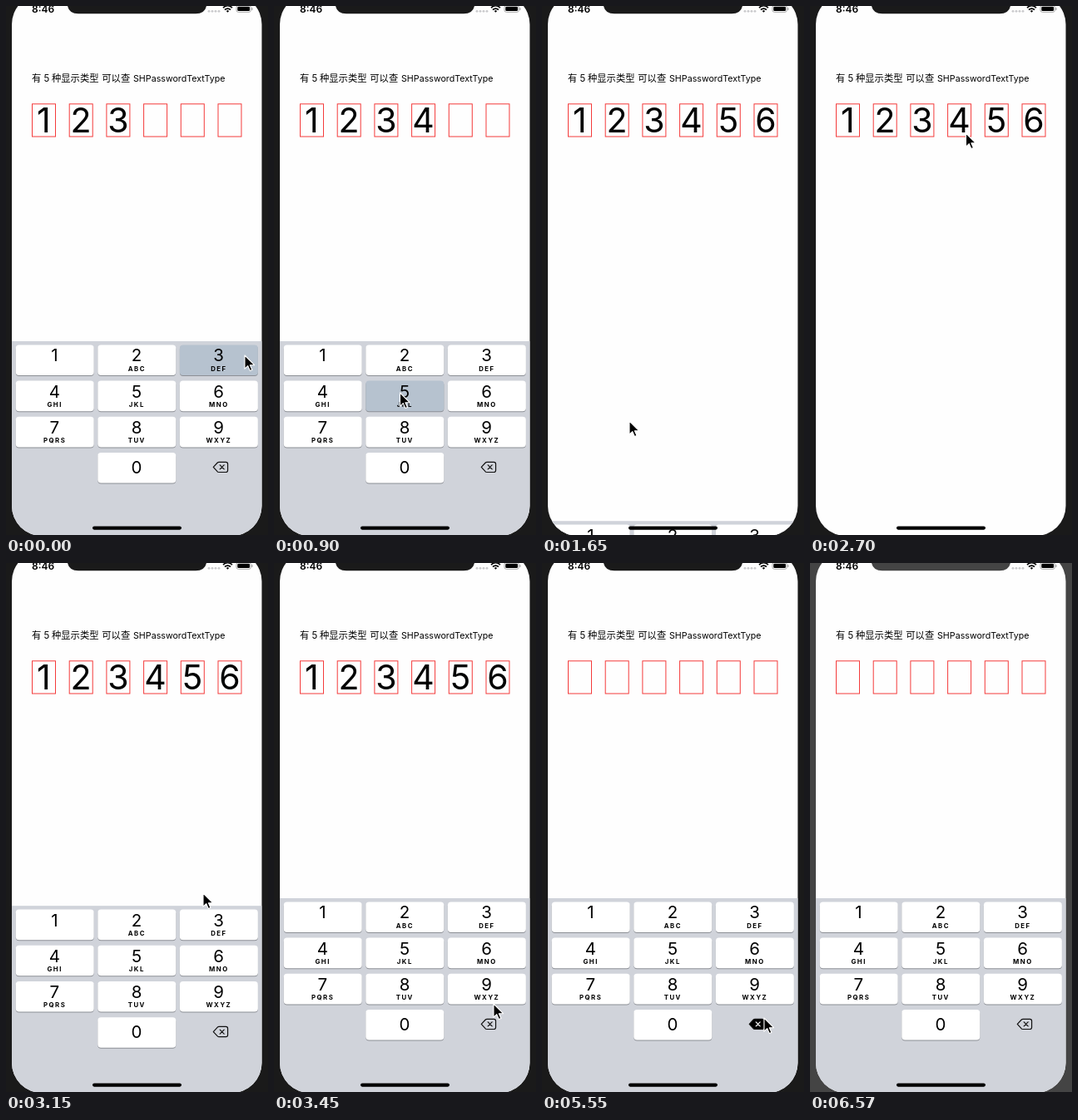
An HTML page for the animation above (6.62 s loop, 315 px wide and 636 px high).

```html
<!DOCTYPE html>
<html lang="zh">
<head>
<meta charset="utf-8">
<title>Passcode field</title>
<style>
  html, body { margin: 0; width: 100%; height: 100%; overflow: hidden; }
  svg { display: block; width: 315px; height: 636px; font-family: Inter, "Noto Sans CJK SC", "Noto Sans CJK", sans-serif; }
  .bezel { fill: #1a1a1a; }
  .lit .bezel { fill: #444; }
  .key rect { fill: #fff; }
  .key .shade { fill: #8c8f95; }
  .key.down .face { fill: #b6c2cf; }
  .key text, .digit { text-anchor: middle; }
  .num { font-size: 20.5px; }
  .sub { font-size: 7.8px; font-weight: 700; letter-spacing: 1.5px; }
  .digit { font-size: 41px; }
  .box { fill: none; stroke: #f43a3a; }
  .del { fill: none; stroke: #111; stroke-width: 1.2; stroke-linejoin: round; stroke-linecap: round; }
  .down .outline { fill: #000; }
  .down .cross { stroke: #fff; }
</style>
</head>
<body>
<svg id="stage" viewBox="0 0 315 636">
  <defs>
    <clipPath id="screen"><rect x="7" y="-14" width="300.5" height="651" rx="36"/></clipPath>
  </defs>
  <rect class="bezel" width="315" height="636"/>
  <g clip-path="url(#screen)">
    <rect y="-14" width="315" height="651" fill="#fefefe"/>
    <g font-size="11.3">
      <text x="31" y="91">有</text>
      <text x="45.5" y="91">5</text>
      <text x="55" y="91">种显示类型</text>
      <text x="115.3" y="91">可以查</text>
      <text x="153" y="91" font-size="10.7">SHPasswordTextType</text>
    </g>
    <g id="field"></g>
    <g id="keyboard">
      <rect y="403" width="315" height="240" fill="#d0d3da"/>
      <g id="delete" class="del">
        <path class="outline" d="M249.3 554.4L254.3 549Q255 548.3 256 548.3H264.4Q266.6 548.3 266.6 550.5V558.3Q266.6 560.5 264.4 560.5H256Q255 560.5 254.3 559.8Z"/>
        <path class="cross" d="M257.2 551.9l5 5m0-5l-5 5"/>
      </g>
    </g>
    <rect x="104" y="625.5" width="107" height="4.2" rx="2.1"/>
  </g>
  <path class="bezel" d="M74 0Q76 9.3 87 9.3H228Q239 9.3 241 0Z"/>
  <text x="31" y="8" font-size="12" font-weight="600">8:46</text>
  <g id="signal" fill="#c9c9cc"></g>
  <g fill="none" stroke="#000" stroke-width="1.7">
    <path d="M261 2.1Q266.5 -2.7 272 2.1M263 4.5Q266.5 1.6 270 4.5"/>
    <path d="M264.8 6L266.5 5L268.2 6L266.5 7.8Z" fill="#000" stroke="none"/>
    <rect x="277" y="-.6" width="17.4" height="8" rx="2.4" stroke="#999" stroke-width=".8"/>
    <path d="M296 2v3" stroke="#999" stroke-width="1"/>
    <rect x="278.3" y=".7" width="14.8" height="5.4" rx="1.3" fill="#000" stroke="none"/>
  </g>
  <path id="cursor" d="M0 0V16.2L3.8 12.6L6.4 18.6L9 17.5L6.4 11.7H11.6Z" stroke="#fff" stroke-width="1.1" stroke-linejoin="round"/>
</svg>
<script>
const LOOP = 6620, STEP = 150, LIT_AT = 6570;
const KEYBOARD_HEIGHT = 234, HIDE_AT = 1415, SHOW_AT = 2870;
const $ = id => document.getElementById(id);

function add(parent, tag, attrs, text = '') {
  const node = document.createElementNS('http://www.w3.org/2000/svg', tag);
  for (const name in attrs) node.setAttribute(name, attrs[name]);
  node.textContent = text;
  return parent.appendChild(node);
}

const digits = [];
for (let i = 0; i < 6; i++) {
  const x = 31.5 + i * 44.7;
  add($('field'), 'rect', { class: 'box', x, y: 117.8, width: 28, height: 39.2 });
  digits.push(add($('field'), 'text', { class: 'digit', x: x + 13.9, y: 152.3 }, i + 1));
}

for (let i = 0; i < 4; i++) add($('signal'), 'circle', { cx: 244 + i * 4, cy: 6.3, r: 1.4 });

const keys = { del: $('delete') };
function addKey(label, letters, col, row) {
  const x = 11.7 + col * 98.6, y = 407.4 + row * 43.2;
  const key = keys[label] = add($('keyboard'), 'g', { class: 'key' });
  const size = { x, width: 94, height: 36.6, rx: 4 };
  add(key, 'rect', { ...size, y: y + 1, class: 'shade' });
  add(key, 'rect', { ...size, y, class: 'face' });
  add(key, 'text', { class: 'num', x: x + 46.7, y: y + (label ? 20 : 24.6) }, label);
  add(key, 'text', { class: 'sub', x: x + 47, y: y + 31.5 }, letters);
}
['', 'ABC', 'DEF', 'GHI', 'JKL', 'MNO', 'PQRS', 'TUV', 'WXYZ']
  .forEach((letters, i) => addKey(i + 1, letters, i % 3, Math.floor(i / 3)));
addKey(0, '', 1, 3);

// [key, pressed at, released at]
const presses = [
  [3, 0, 150], [4, 450, 750], [5, 900, 1200], [6, 1350, 1500],
  ...[3900, 4200, 4500, 4800, 5100, 5550].map(at => ['del', at, at + STEP])
];
const typedAt = [600, 1050, 1500];
const deletedAt = presses.filter(p => p[0] === 'del').map(p => p[1]);

// [time, x, y]
const path = [
  [0, 287, 420], [450, 66, 475], [600, 66, 475], [900, 151.5, 465], [1050, 151.5, 465],
  [1350, 246, 466], [1650, 105, 499], [2100, 122, 340], [2550, 180, 165], [2850, 195, 141],
  [3150, 237, 397], [3450, 264, 530], [3750, 267, 547], [5700, 267, 547],
  [5850, 263, 572], [6000, 258, 614], [6150, 254, 660]
];

function cursorAt(t) {
  const next = path.findIndex(p => p[0] > t);
  if (next < 0) return path[path.length - 1].slice(1);
  const [t0, x0, y0] = path[next - 1], [t1, x1, y1] = path[next];
  const k = (t - t0) / (t1 - t0);
  return [x0 + (x1 - x0) * k, y0 + (y1 - y0) * k];
}

// Critically damped spring, 0 to 1
function spring(ms) {
  const w = Math.max(0, ms) * 0.018;
  return 1 - Math.exp(-w) * (1 + w);
}

const countPast = (times, t) => times.filter(at => at <= t).length;

function render(time) {
  const t = Math.floor(time / STEP) * STEP;
  const shown = 3 + countPast(typedAt, t) - countPast(deletedAt, t);
  digits.forEach((d, i) => d.setAttribute('visibility', i < shown ? 'visible' : 'hidden'));

  const held = presses.find(([, from, to]) => t >= from && t < to);
  for (const name in keys) keys[name].classList.toggle('down', !!held && String(held[0]) === name);

  const hidden = spring(t - HIDE_AT) - spring(t - SHOW_AT);
  const drop = t >= SHOW_AT + 400 ? 0 : hidden * KEYBOARD_HEIGHT;
  $('keyboard').setAttribute('transform', `translate(0 ${drop.toFixed(2)})`);
  $('cursor').setAttribute('transform', `translate(${cursorAt(t)})`);
  $('stage').classList.toggle('lit', time >= LIT_AT);
}

const start = performance.now();
function tick() {
  render((performance.now() - start) % LOOP);
  requestAnimationFrame(tick);
}
tick();
</script>
</body>
</html>
```
